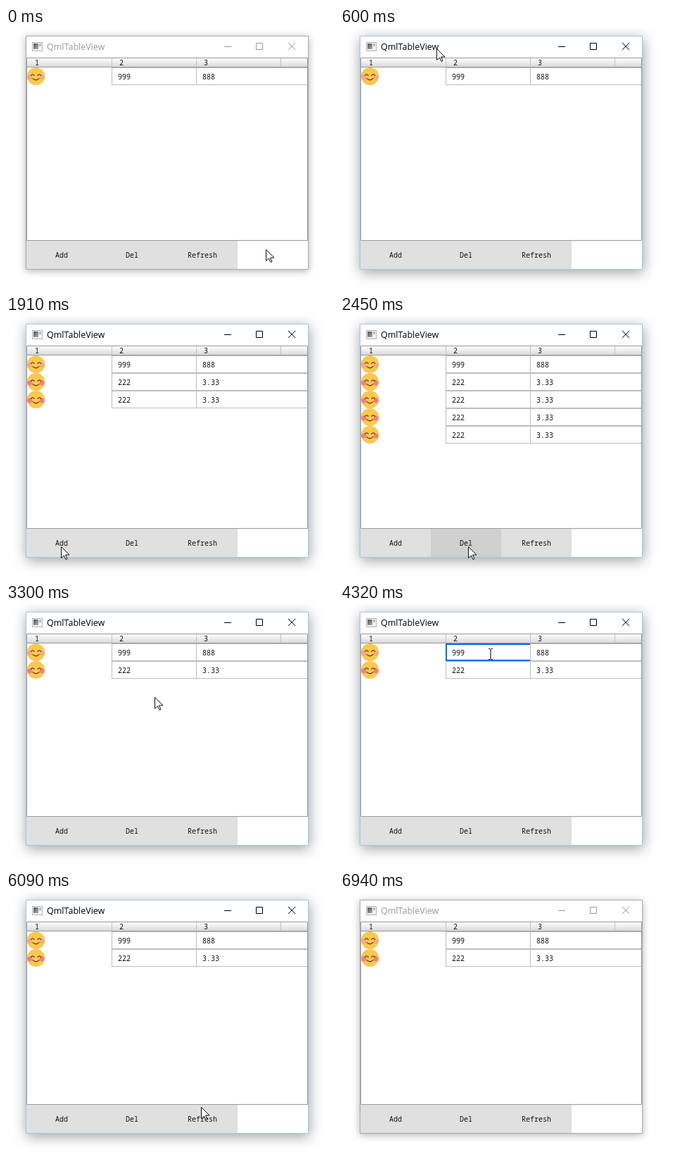
Animation, 466 px wide and 369 px high, one loop 7.32 s. Source, as an HTML page:

```html
<!DOCTYPE html>
<html lang="en">
<head>
<meta charset="utf-8">
<title>QmlTableView</title>
<style>
  html, body { margin: 0; width: 100%; height: 100%; overflow: hidden; background: #fff; }
  #win {
    position: absolute; left: 28px; top: 11px; width: 400px; height: 330px;
    background: #fff; border: 1px solid #aaa;
    box-shadow: 0 2px 10px rgba(0, 0, 0, .3);
  }
  #win.active { border-color: #9cc9e4; box-shadow: 1px 4px 18px rgba(0, 0, 0, .38); }
  svg { position: absolute; left: 0; top: 0; }
  text { font: 10px "Noto Sans Mono", "DejaVu Sans Mono", monospace; fill: #111; }
  .bar text { font: 12.5px "Open Sans", "Noto Sans", sans-serif; fill: #999; }
  .bar path { stroke: #999; fill: none; }
  .active .bar text { fill: #000; }
  .active .bar path { stroke: #000; }
  .field { fill: #fff; stroke: #bdbdbd; }
  .focus { fill: none; stroke: #0066ff; stroke-width: 2; }
  .btn { fill: #e0e0e0; }
  .btn.down { fill: #d0d0d0; }
  .mid { text-anchor: middle; }
  .line { fill: none; stroke: #5a3a24; stroke-width: 1.3; stroke-linecap: round; }
</style>
</head>
<body>
<div id="win"></div>
<svg id="stage" width="466" height="369" viewBox="0 0 466 369">
  <defs>
    <linearGradient id="head" x2="0" y2="1">
      <stop offset="0" stop-color="#fefefe"/><stop offset="1" stop-color="#dadada"/>
    </linearGradient>
    <linearGradient id="pane" x2="1" y2="1">
      <stop offset="0" stop-color="#555"/><stop offset="1" stop-color="#aaa"/>
    </linearGradient>
    <clipPath id="view"><rect x="30" y="56" width="398" height="245"/></clipPath>
  </defs>

  <g class="bar">
    <rect x="37.5" y="20.5" width="14" height="12" fill="#f6f6f6" stroke="#b0b0b0"/>
    <rect x="39" y="22" width="7" height="8" fill="url(#pane)"/>
    <rect x="47" y="22" width="3" height="4" fill="#b8bcc0"/>
    <text x="58" y="31">QmlTableView</text>
    <path d="M310 26.5h10M355.5 21.5h9v9h-9zM401 21l10 10M411 21l-10 10"/>
  </g>

  <rect x="30" y="43" width="398" height="12" fill="url(#head)"/>
  <g id="columns"></g>
  <g id="rows" clip-path="url(#view)"></g>
  <path d="M29.5 42.5h399v259h-399zM30 55.5h398" fill="none" stroke="#999"/>
  <g id="buttons"></g>

  <path id="arrow" d="M.5 .5v16l4-3.5 2.5 5.5 2-1-2.5-5.5h5.5z" fill="#fff" stroke="#111"/>
  <path id="beam" d="M-3 -7.5h2.5M.5 -7.5h2.5M0 -7v14M-3 7.5h2.5M.5 7.5h2.5" fill="none" stroke="#222" stroke-width="1.2"/>
</svg>
<script>
const LOOP = 7320, ROW = 25, COLUMN = 120, BUTTON = 100, TOP = 56;
const $ = id => document.getElementById(id);
const build = (id, count, part) => {
  $(id).innerHTML = Array.from({ length: count }, (_, i) => part(i)).join('');
  return [...$(id).children];
};

const face = blush => `
  <circle cx="42.5" cy="68.5" r="12.6" fill="#fdc84e"/>
  <circle cx="33.8" cy="70" r="3.4" fill="${blush}"/>
  <circle cx="51.2" cy="70" r="3.4" fill="${blush}"/>
  <path class="line" d="M35.5 67.2q2.3-2.6 4.6 0M45 67.2q2.3-2.6 4.6 0M38 71.6q4.5 4.4 9 0"/>`;

const field = (x, value) =>
  `<rect class="field" x="${x}.5" y="56.5" width="199" height="24"/><text x="${x + 9}" y="73">${value}</text>`;

const focus = `<g id="focus"><rect class="focus" x="151" y="57" width="198" height="23"/>
  <rect id="caret" x="178" y="62" width="1" height="12"/></g>`;

build('columns', 3, i => `<path d="M${150.5 + i * COLUMN} 43v12" stroke="#c4c4c4"/>
  <text x="${41 + i * COLUMN}" y="53">${i + 1}</text>`);

const rows = build('rows', 5, i => `<g transform="translate(0 ${i * ROW})">
  ${i ? face('#f67c80') + field(150, '222') + field(270, '3.33')
      : face('#f5aa86') + field(150, '999') + focus + field(270, '888')}</g>`);

const buttons = build('buttons', 3, i => `<g>
  <rect class="btn" x="${29 + i * BUTTON}" y="302" width="${BUTTON}" height="40"/>
  <text class="mid" x="${79 + i * BUTTON}" y="326">${['Add', 'Del', 'Refresh'][i]}</text></g>`);
const del = buttons[1].firstElementChild;

// Clicks on Add and Del, in ms.
const added = [1670, 1910, 2070, 2220];
const removed = [2530, 2760, 2910];
const past = (times, t) => times.filter(time => time <= t).length;
const within = (t, from, to) => t >= from && t < to;

// Pointer stops as [tick, x, y]; the pointer is only redrawn once per tick.
const TICK = 77.15, LEAD = 28;
const stops = [
  [0, 369, 314], [7, 137, 29], [10, 137, 29], [19, 78, 327],
  [29, 78, 327], [32, 182, 327], [38, 182, 327], [43, 211, 132], [47, 214, 71],
  [64, 214, 71], [67, 331, 62], [68, 333, 45], [71, 318, 351], [73, 271, 318],
  [78, 271, 318], [79, 277, 305], [83, 432, 68], [87, 432, 351], [96, 432, 351],
];

function pointer(t) {
  const tick = Math.floor((t + LEAD) / TICK);
  const next = stops.findIndex(([time]) => time > tick);
  const [a, b] = [stops[next - 1], stops[next]];
  const u = (tick - a[0]) / (b[0] - a[0]);
  return [1, 2].map(n => Math.round(a[n] + (b[n] - a[n]) * u));
}

const show = (el, on) => el.setAttribute('visibility', on ? 'inherit' : 'hidden');

function draw(t) {
  const active = within(t, 600, 6940);
  $('win').classList.toggle('active', active);
  $('stage').classList.toggle('active', active);

  const count = 1 + past(added, t) - past(removed, t);
  rows.forEach((el, i) => show(el, i < count));
  const focused = within(t, 3770, 5710);
  show($('focus'), focused);
  show($('caret'), focused && (t - 3770) % 1080 < 545);
  del.classList.toggle('down', within(t, 2450, 2530));

  const [x, y] = pointer(t);
  const overField = within(x, 150, 428) && within(y, TOP, TOP + count * ROW);
  for (const id of ['arrow', 'beam']) {
    $(id).setAttribute('transform', `translate(${x} ${y})`);
    show($(id), t < 6940 && overField === (id === 'beam'));
  }
}

const begin = performance.now();
function tick() {
  draw((performance.now() - begin) % LOOP);
  requestAnimationFrame(tick);
}
tick();
</script>
</body>
</html>
```
